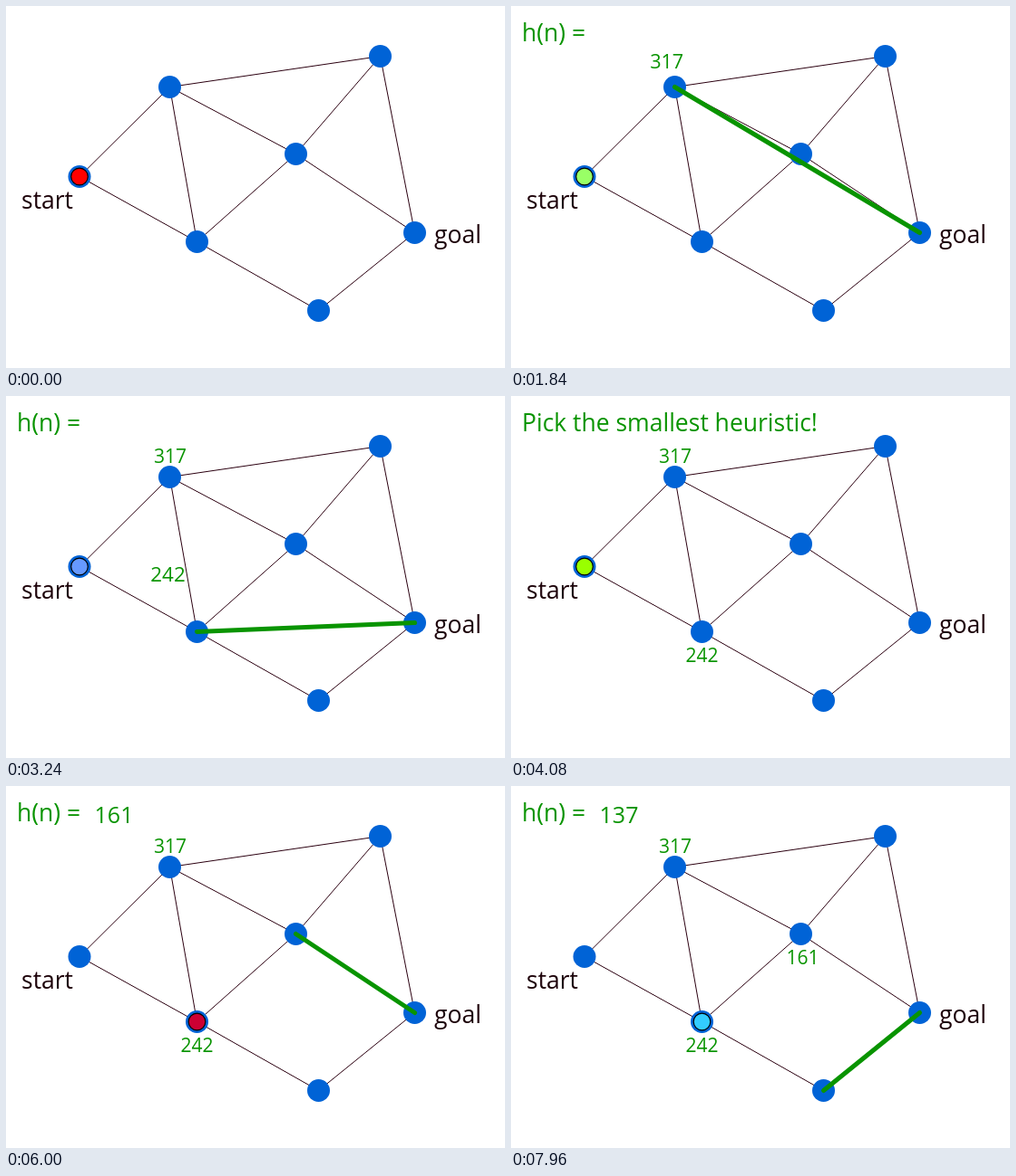
An HTML page with a canvas for the animation above (8 s loop, 550 by 400 pixels).

```html
<!DOCTYPE html>
<html lang="en">
<head>
<meta charset="utf-8">
<title>Greedy best-first search</title>
<style>
  html, body { margin: 0; width: 100%; height: 100%; overflow: hidden; background: #fff; }
  canvas { display: block; }
</style>
</head>
<body>
<canvas id="stage" width="550" height="400"></canvas>
<script>
const ctx = document.getElementById('stage').getContext('2d');
const STEP = 40, STEPS = 200;
const GREEN = '#099400', DARK = '#1c0008', BLUE = '#0063d6';

const nodes = {
  start: [81, 188.5], top: [180.5, 89.5], right: [412.5, 55.5], mid: [319.5, 163.5],
  low: [210.5, 260.5], goal: [450.5, 250.5], bottom: [344.5, 336.5]
};
const edges = [
  ['start', 'top'], ['start', 'low'], ['top', 'right'], ['top', 'mid'], ['top', 'low'],
  ['low', 'mid'], ['mid', 'right'], ['mid', 'goal'], ['right', 'goal'],
  ['low', 'bottom'], ['bottom', 'goal']
];

// Each estimate appears in the heading, then flies to its node.
const HEADING_SPOT = [119, 41];
const estimates = [
  { text: '317', node: 'top', show: 9, go: 29, land: 49, spot: [181, 74] },
  { text: '242', node: 'low', show: 49, go: 68, land: 88, spot: [210.5, 293.5] },
  { text: '161', node: 'mid', show: 149, go: 169, land: 189, spot: [321.5, 197] },
  { text: '137', node: 'bottom', show: 189, go: STEPS, land: STEPS + 20, spot: HEADING_SPOT }
];
const PICK = 88, MOVE = 109, ARRIVE = 129, EXPAND = 149;

// Colour cycle of the marker: step, then RGB.
const hues = [
  [0, 255, 0, 0], [5, 0, 0, 255], [9, 0, 255, 0], [14, 255, 255, 0],
  [19, 0, 255, 255], [24, 255, 0, 255], [29, 255, 0, 0]
];
const CYCLE = 30;

const mix = (a, b, k) => a + (b - a) * k;
const mixPoint = (p, q, k) => [mix(p[0], q[0], k), mix(p[1], q[1], k)];
const progress = (n, from, to) => Math.min(1, Math.max(0, (n - from) / (to - from)));

function line(a, b, color, width) {
  ctx.strokeStyle = color;
  ctx.lineWidth = width;
  ctx.beginPath();
  ctx.moveTo(...a);
  ctx.lineTo(...b);
  ctx.stroke();
}

function disc([x, y], radius, color) {
  ctx.fillStyle = color;
  ctx.beginPath();
  ctx.arc(x, y, radius, 0, 2 * Math.PI);
  ctx.fill();
}

function label(text, [x, y], color, size = 26.5, align = 'left') {
  ctx.font = `${size}px "Open Sans", "Noto Sans", sans-serif`;
  ctx.textAlign = align;
  ctx.fillStyle = color;
  ctx.fillText(text, x, y);
}

function markerColor(n) {
  const restart = [EXPAND, ARRIVE, MOVE, 0].find(s => n >= s);
  const phase = (n - restart) % CYCLE;
  const i = hues.findIndex(h => h[0] >= phase) || 1;
  const [from, ...a] = hues[i - 1], [to, ...b] = hues[i];
  const k = progress(phase, from, to);
  return `rgb(${a.map((v, j) => Math.round(mix(v, b[j], k)))})`;
}

function draw(n) {
  ctx.fillStyle = '#fff';
  ctx.fillRect(0, 0, 550, 400);
  ctx.lineCap = 'round';

  for (const [a, b] of edges) line(nodes[a], nodes[b], '#2b0010', 1);
  for (const p of Object.values(nodes)) disc(p, 12.5, BLUE);
  label('start', [17, 224], DARK);
  label('goal', [472, 262], DARK);

  for (const e of estimates) {
    if (n >= e.show && n < e.land) line(nodes[e.node], nodes.goal, GREEN, 5);
  }

  disc(mixPoint(nodes.start, nodes.low, progress(n, MOVE, ARRIVE)), 9.3, markerColor(n));
  ctx.strokeStyle = '#000';
  ctx.lineWidth = 1.2;
  ctx.stroke();

  if (n >= PICK && n < EXPAND) label('Pick the smallest heuristic!', [12, 39], GREEN);
  else if (n >= estimates[0].show) label('h(n) =', [12, 39], GREEN);

  for (const e of estimates) {
    if (n < e.show) continue;
    const k = progress(n, e.go, e.land);
    label(e.text, mixPoint(HEADING_SPOT, e.spot, k), GREEN, mix(25, 21, k), 'center');
  }
}

function tick() {
  draw(Math.floor(performance.now() / STEP) % STEPS);
  requestAnimationFrame(tick);
}
tick();
</script>
</body>
</html>
```
